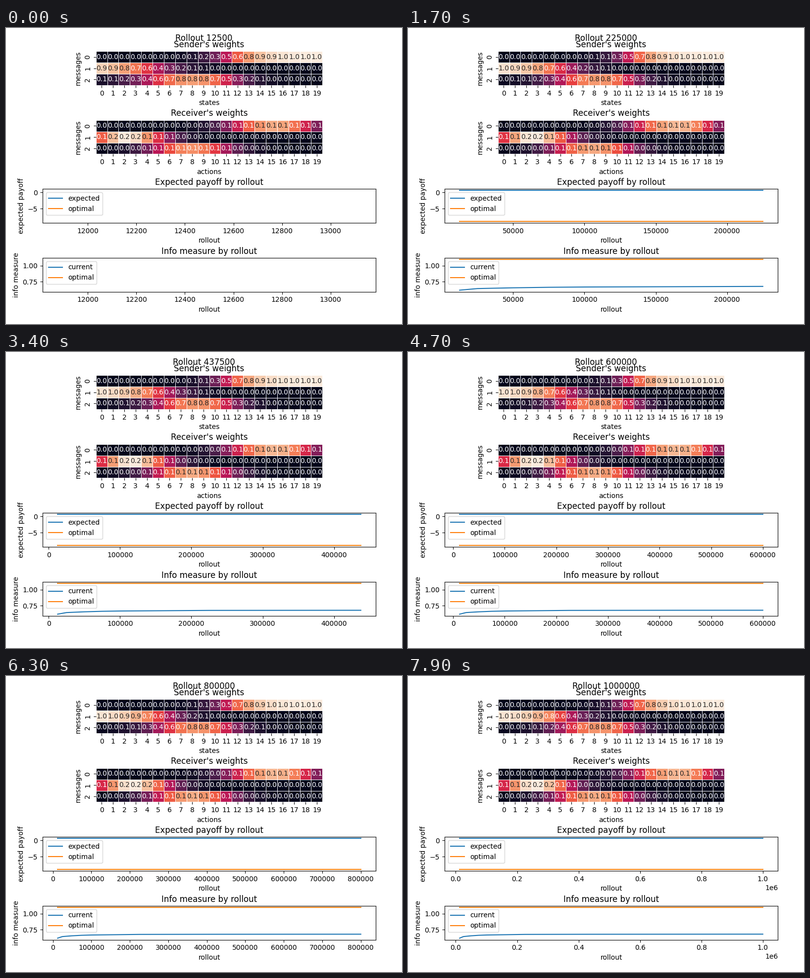
These frames come from a looping animation (800x600 px, 8000 ms). A matplotlib script:

```python
import numpy as np
import matplotlib.pyplot as plt
from matplotlib.animation import FuncAnimation
from matplotlib.colors import LinearSegmentedColormap

W, H = 800, 600
FRAMES, INTERVAL, STEP = 80, 100, 12500
STATES = np.arange(20)

ROCKET = LinearSegmentedColormap.from_list("rocket_like", [
    (0, "#03051A"), (1 / 11, "#221331"), (2 / 11, "#451C47"), (3 / 11, "#6A1F56"),
    (4 / 11, "#921C5B"), (5 / 11, "#B91657"), (6 / 11, "#D92847"), (0.6, "#E83F3F"),
    (7 / 11, "#ED513E"), (8 / 11, "#F47C56"), (0.8, "#F69C73"), (9 / 11, "#F6A47B"),
    (10 / 11, "#F7C9AA"), (1, "#FAEBDD")], N=256)

# Training stages (in rollouts) between which the policies drift logarithmically.
STAGES = np.log([12500, 100000, 225000, 600000, 1000000])


def drift(rollout, values):
    return np.interp(np.log(rollout), STAGES, values)


def sigmoid(x):
    return 1 / (1 + np.exp(-x))


def bump(center, left, right, power, height=1.0):
    d = STATES - center
    return height * np.exp(-np.abs(d / np.where(d < 0, left, right)) ** power)


def sender_weights(rollout):
    k0 = drift(rollout, [0.768, 0.84, 0.84, 0.84, 0.84])
    c0 = drift(rollout, [11.21, 11.13, 11.13, 11.13, 11.13])
    k1 = drift(rollout, [0.58, 0.67, 0.67, 0.6926, 0.70])
    c1 = drift(rollout, [4.5, 5.085, 5.32, 5.467, 5.58])
    high = sigmoid(k0 * (STATES - c0))
    low = sigmoid(k1 * (c1 - STATES))
    return np.clip([high, low, 1 - high - low], 0, 1)


def receiver_weights(rollout):
    peak = drift(rollout, [0.178, 0.175, 0.173, 0.1713, 0.1713])
    high = bump(15.3, 4.4, 3.75, 2.2, drift(rollout, [0.835, 0.85, 0.86, 0.86, 0.86]))
    low = bump(drift(rollout, [2.2, 2.5, 2.57, 2.66, 2.71]), 3.4, 3.64, 2)
    middle = bump(drift(rollout, [7.9, 7.85, 7.9, 8.0, 8.0]), 3.97, 3.85, 2.1,
                  drift(rollout, [0.765, 0.81, 0.82, 0.83, 0.83]))
    return peak * np.array([high, low, middle])


def info_measure(rollouts):
    return np.interp(
        rollouts / 1000,
        [12.5, 25, 50, 75, 100, 225, 437.5, 1000],
        [0.6157, 0.641, 0.653, 0.661, 0.6655, 0.675, 0.677, 0.679])


def luminance(rgba):
    rgb = rgba[..., :3]
    linear = np.where(rgb <= 0.03928, rgb / 12.92, ((rgb + 0.055) / 1.055) ** 2.4)
    return linear @ [0.2126, 0.7152, 0.0722]


class Heatmap:
    def __init__(self, ax, title, xlabel):
        self.mesh = ax.pcolormesh(np.zeros((3, 20)), cmap=ROCKET,
                                  linewidth=0.5, edgecolor="white")
        ax.set(title=title, xlabel=xlabel, ylabel="messages",
               xlim=(0, 20), ylim=(3, 0), aspect="equal")
        ax.set_xticks(STATES + 0.5, STATES)
        ax.set_yticks(np.arange(3) + 0.5, range(3), rotation="vertical", va="center")
        ax.spines[:].set_visible(False)
        self.labels = [ax.text(x + 0.5, y + 0.5, "", ha="center", va="center")
                       for y in range(3) for x in STATES]

    def update(self, data):
        self.mesh.set_array(data)
        self.mesh.set_clim(data.min(), data.max())
        shades = luminance(ROCKET(self.mesh.norm(data)))
        for label, value, shade in zip(self.labels, data.flat, shades.flat):
            label.set_text(f"{value:.1f}")
            label.set_color(".15" if shade > 0.408 else "w")


class Chart:
    def __init__(self, ax, title, ylabel, first_label):
        self.ax = ax
        self.lines = [ax.plot([], [], label=name)[0] for name in (first_label, "optimal")]
        ax.set(title=title, xlabel="rollout", ylabel=ylabel)
        ax.legend(loc="upper left")

    def update(self, rollouts, *series):
        for line, values in zip(self.lines, series):
            line.set_data(rollouts, np.broadcast_to(values, rollouts.shape))
        self.ax.relim()
        self.ax.autoscale_view()


fig = plt.figure(figsize=(W / 100, H / 100), dpi=100)
LEFT, WIDTH, HEIGHT = 73.6, 673.8, 68.63
FIRST_BOTTOM, ROW_PITCH = 115.83, 139.58
axes = [fig.add_axes([LEFT / W, 1 - (FIRST_BOTTOM + ROW_PITCH * row) / H,
                      WIDTH / W, HEIGHT / H])
        for row in range(4)]
heading = fig.suptitle("")
sender = Heatmap(axes[0], "Sender's weights", "states")
receiver = Heatmap(axes[1], "Receiver's weights", "actions")
payoff = Chart(axes[2], "Expected payoff by rollout", "expected payoff", "expected")
info = Chart(axes[3], "Info measure by rollout", "info measure", "current")


def update(frame):
    rollouts = STEP * np.arange(1, frame + 2)
    current = rollouts[-1]
    heading.set_text(f"Rollout {current}")
    sender.update(sender_weights(current))
    receiver.update(receiver_weights(current))
    payoff.update(rollouts, 0.56, -8.92)
    info.update(rollouts, info_measure(rollouts), np.log(3))
    return []


anim = FuncAnimation(fig, update, frames=FRAMES, interval=INTERVAL,
                     repeat=True, repeat_delay=0, cache_frame_data=False)
plt.show()
```
